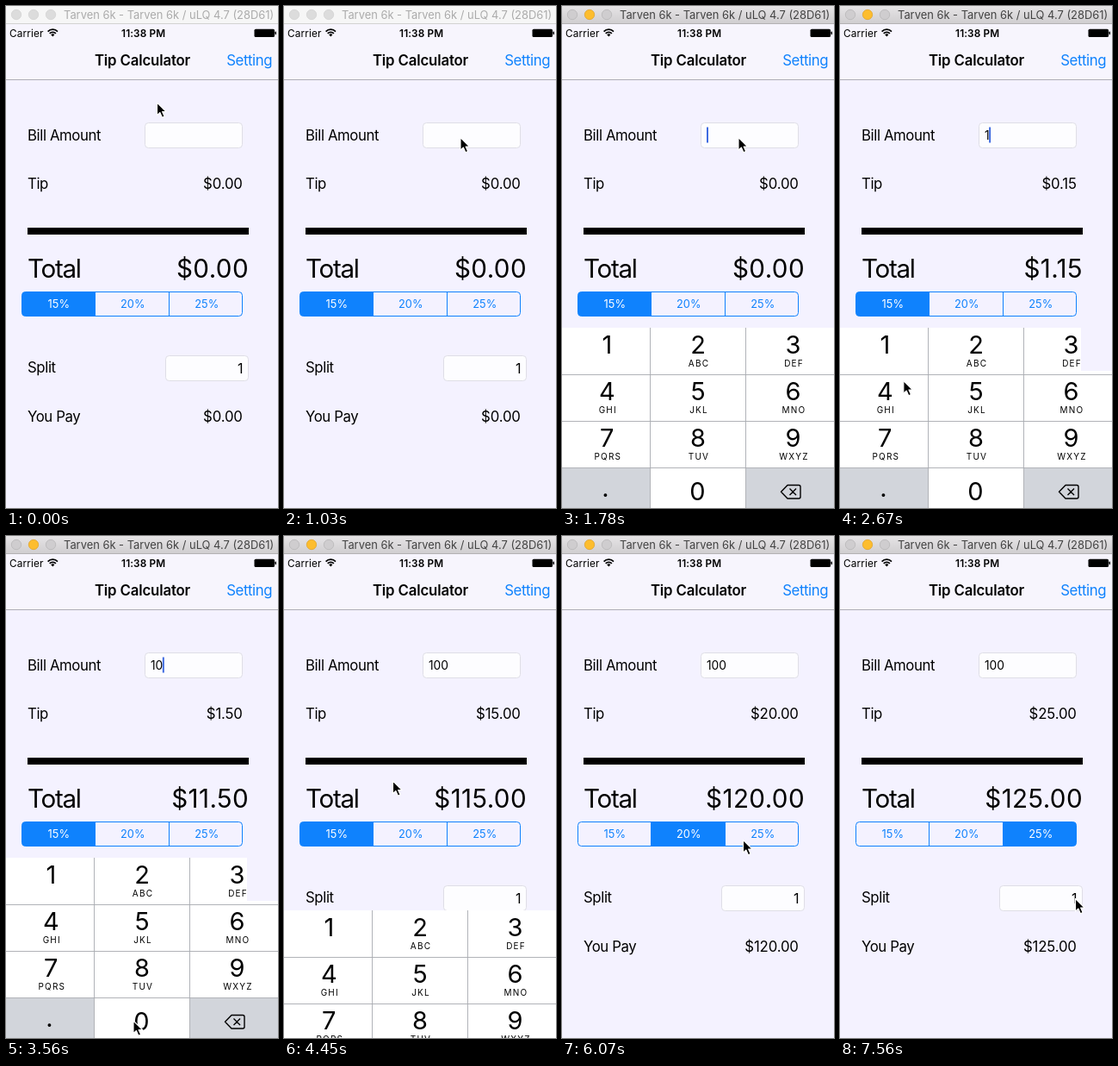
Animation, 316 px wide and 582 px high, one loop 8 s. Source, as an HTML page:

```html
<!DOCTYPE html>
<html lang="en">
<head>
<meta charset="utf-8">
<title>Tip Calculator</title>
<style>
  html, body { margin: 0; width: 100%; height: 100%; overflow: hidden; background: #f4f2ff; }
  svg { display: block; width: 316px; height: 582px; font-family: Inter, Roboto, sans-serif; }
</style>
</head>
<body>
<svg id="stage" viewBox="0 0 316 582">
  <defs>
    <linearGradient id="chrome" x2="0" y2="1">
      <stop offset="0" stop-color="#e6e4e6"/>
      <stop offset="1" stop-color="#d0ced0"/>
    </linearGradient>
  </defs>
  <rect width="316" height="582" fill="#f4f2ff"/>
</svg>
<script>
const NS = 'http://www.w3.org/2000/svg';
const LOOP = 8000, STEP = LOOP / 54;
const BLUE = '#0f82fd';
const stage = document.getElementById('stage');

function add(tag, attrs, parent = stage) {
  const el = document.createElementNS(NS, tag);
  for (const name in attrs) el.setAttribute(name, attrs[name]);
  parent.appendChild(el);
  return el;
}
const set = (el, name, value) => el.setAttribute(name, value);
const show = (el, on) => set(el, 'visibility', on ? 'visible' : 'hidden');
const rect = (x, y, width, height, fill, more, parent) =>
  add('rect', { x, y, width, height, fill, ...more }, parent);

function text(str, x, y, size, more, parent) {
  const el = add('text', { x, y, 'font-size': size, ...more }, parent);
  el.textContent = str;
  return el;
}
const END = { 'text-anchor': 'end' };
const MID = { 'text-anchor': 'middle' };
const track = px => ({ 'letter-spacing': px });

// Window title bar
const bar = rect(0, 0, 316, 20, '#f6f6f6');
const barEdge = rect(0, 20, 316, 1, '#d2d2d2');
const lights = [12, 32, 52].map(cx => add('circle', { cx, cy: 10, r: 5.7, 'stroke-width': 0.7 }));
const caption = text('Tarven 6k - Tarven 6k / uLQ 4.7 (28D61)', 67, 15, 12.9);

// Status and navigation bars
rect(0, 21, 316, 64, '#f7f5fd');
rect(0, 85, 316, 1, '#aeadb4');
text('Carrier', 4, 35.5, 11.8, track(0.15));
const wifi = add('g', { fill: 'none', stroke: '#000', 'stroke-width': 1.7 });
add('path', { d: 'M48.6 29.6a8 8 0 0 1 11.4 0M50.7 31.9a5 5 0 0 1 7.2 0' }, wifi);
add('path', { d: 'M52.2 33.2a3 3 0 0 1 4.2 0l-2.1 2.2z', fill: '#000', stroke: 'none' }, wifi);
text('11:38 PM', 159.6, 35.5, 11.8, { ...MID, ...track(0.1), 'font-weight': 600 });
rect(288.5, 26.7, 23.5, 9.3, '#000', { rx: 1.5 });
rect(312.5, 29.5, 1.5, 3.7, '#000', { rx: 0.7 });
text('Tip Calculator', 158.5, 69, 16.8, { ...MID, ...track(-0.15), 'font-weight': 600 });
text('Setting', 309.2, 69, 16.8, { ...END, ...track(-0.4), fill: BLUE });

// Form
const label = (str, y) => text(str, 25, y, 16.8, track(-0.4));
const money = y => text('', 274.8, y, 16.8, { ...END, ...track(-0.15) });
const field = (x, y, w) => rect(x, y, w, 29, '#fdfdff', { rx: 4, stroke: '#dfdee6' });

label('Bill Amount', 156);
field(161.5, 135.5, 113);
const bill = text('', 168, 155, 13.8);
const caret = rect(168, 140.5, 2, 18, '#3f6be0');
label('Tip', 212);
const tip = money(212);
rect(25, 257, 257, 8, '#000');
text('Total', 25, 315, 29.6, track(-1.3));
const total = text('', 282, 315, 29.6, { ...END, ...track(0.4) });
label('Split', 425);
field(185.5, 405.5, 96);
text('1', 275.6, 425.5, 16, END);
label('You Pay', 482);
const pay = money(482);

// Segmented control
const RATES = [15, 20, 25];
const picked = rect(18, 331, 86, 29, BLUE);
const SEG = 'M22.5 331.5H270.5a4 4 0 0 1 4 4V355.5a4 4 0 0 1-4 4H22.5a4 4 0 0 1-4-4V335.5a4 4 0 0 1 4-4z';
add('path', { d: SEG + 'M103.5 331.5v28M189.5 331.5v28', fill: 'none', stroke: BLUE });
set(picked, 'clip-path', 'url(#segClip)');
add('path', { d: SEG, stroke: BLUE }, add('clipPath', { id: 'segClip' }));
const segs = RATES.map((r, i) => text(r + '%', 61.3 + 86 * i, 350, 12.8, MID));

// Keypad, drawn at its raised position
const pad = add('g', {});
rect(0, 373, 316, 209, '#fff', {}, pad);
rect(0, 536, 102, 46, '#d2d5db', {}, pad);
rect(214, 536, 102, 46, '#d2d5db', {}, pad);
add('path', { d: 'M0 427.5H316M0 481.5H316M0 535.5H316M102.5 373V582M213.5 373V582',
  stroke: '#a9abb0', 'stroke-width': 0.9 }, pad);
const COLS = [52.3, 158, 268.5];
const digit = (str, x, y) => text(str, x, y, 29, MID, pad);
['', 'ABC', 'DEF', 'GHI', 'JKL', 'MNO', 'PQRS', 'TUV', 'WXYZ'].forEach((letters, i) => {
  const x = COLS[i % 3], y = 403 + 54 * Math.floor(i / 3);
  digit(i + 1, x, y);
  text(letters, x + 1, y + 15, 10, { ...MID, ...track(1.2) }, pad);
});
digit('.', 50.5, 569);
digit('0', 157.5, 572.5);
add('path', { d: 'M262 555.5H275a2 2 0 0 1 2 2V569a2 2 0 0 1-2 2H262L254.5 563.3zM264.5 559.5l7.5 7.5m0-7.5l-7.5 7.5',
  fill: 'none', stroke: '#000', 'stroke-width': 1.4, 'stroke-linejoin': 'round' }, pad);
const corner = rect(280, 373, 36, 50, '#f4f2ff');

const pointer = add('path', { d: 'M0 0V14.6L3.4 11.5L5.9 17.2L8.6 16L6.1 10.5H10.6Z',
  fill: '#000', stroke: '#fff', 'stroke-width': 1.1, 'stroke-linejoin': 'round' });

// Pointer stops: step, x, y
const PATH = [
  [3, 175.5, 112], [7, 205, 152.5], [12, 205, 152.5], [15, 50, 392], [17, 50, 392],
  [20, 142, 556], [24, 148, 562], [27, 148, 562], [30, 126.5, 284], [31, 126.5, 284],
  [36, 146, 347], [38, 146, 347], [41, 210.5, 352.5], [42, 210.5, 352.5], [44, 228, 348],
  [45, 228, 348], [48, 273.5, 426], [49, 273.5, 426], [51, 273.5, 420.5]
];

const clamp = p => Math.max(0, Math.min(1, p));
const smooth = p => p * p * (3 - 2 * p);
const ramp = (k, from, length) => smooth(clamp((k - from) / length));

function pointerAt(k) {
  const next = PATH.findIndex(p => p[0] > k);
  if (next < 0) return PATH[PATH.length - 1].slice(1);
  if (!next) return PATH[0].slice(1);
  const a = PATH[next - 1], b = PATH[next];
  const p = smooth((k - a[0]) / (b[0] - a[0]));
  return [a[1] + (b[1] - a[1]) * p, a[2] + (b[2] - a[2]) * p];
}

const dollars = n => '$' + n.toFixed(2);

function draw(ms) {
  const k = Math.floor((ms % LOOP + 9) / STEP) % 54;

  const active = k >= 8;
  set(bar, 'fill', active ? 'url(#chrome)' : '#f6f6f6');
  set(barEdge, 'fill', active ? '#b3b1b3' : '#d2d2d2');
  set(caption, 'fill', active ? '#434343' : '#ababab');
  lights.forEach((el, i) => {
    const lit = active && i === 1;
    set(el, 'fill', lit ? '#fdbd2e' : active ? '#cfcdcf' : '#dcdcdc');
    set(el, 'stroke', lit ? '#dfa023' : active ? '#b5b3b5' : '#d0d0d0');
  });

  const typed = '100'.slice(0, (k >= 17) + (k >= 23) + (k >= 26));
  const choice = (k >= 38) + (k >= 45);
  const amount = Number(typed), extra = amount * RATES[choice] / 100;
  bill.textContent = typed;
  tip.textContent = dollars(extra);
  total.textContent = pay.textContent = dollars(amount + extra);

  const blink = (k * STEP + 500) % 1000 < 600;
  show(caret, k >= 9 && k < 29 && blink);
  set(caret, 'x', 168 + (typed ? bill.getComputedTextLength() - 0.5 : 0));

  set(picked, 'x', 18 + 86 * choice);
  segs.forEach((el, i) => set(el, 'fill', i === choice ? '#fff' : BLUE));

  const lift = ramp(k, 9, 2.7) - ramp(k, 29.035, 2.7);
  set(pad, 'transform', `translate(0 ${Math.round(209 * (1 - lift))})`);
  show(pad, lift > 0);
  show(corner, k >= 17 && k < 28);

  set(pointer, 'transform', `translate(${pointerAt(k)})`);
}

const start = performance.now();
function tick() {
  draw(performance.now() - start);
  requestAnimationFrame(tick);
}
tick();
</script>
</body>
</html>
```
